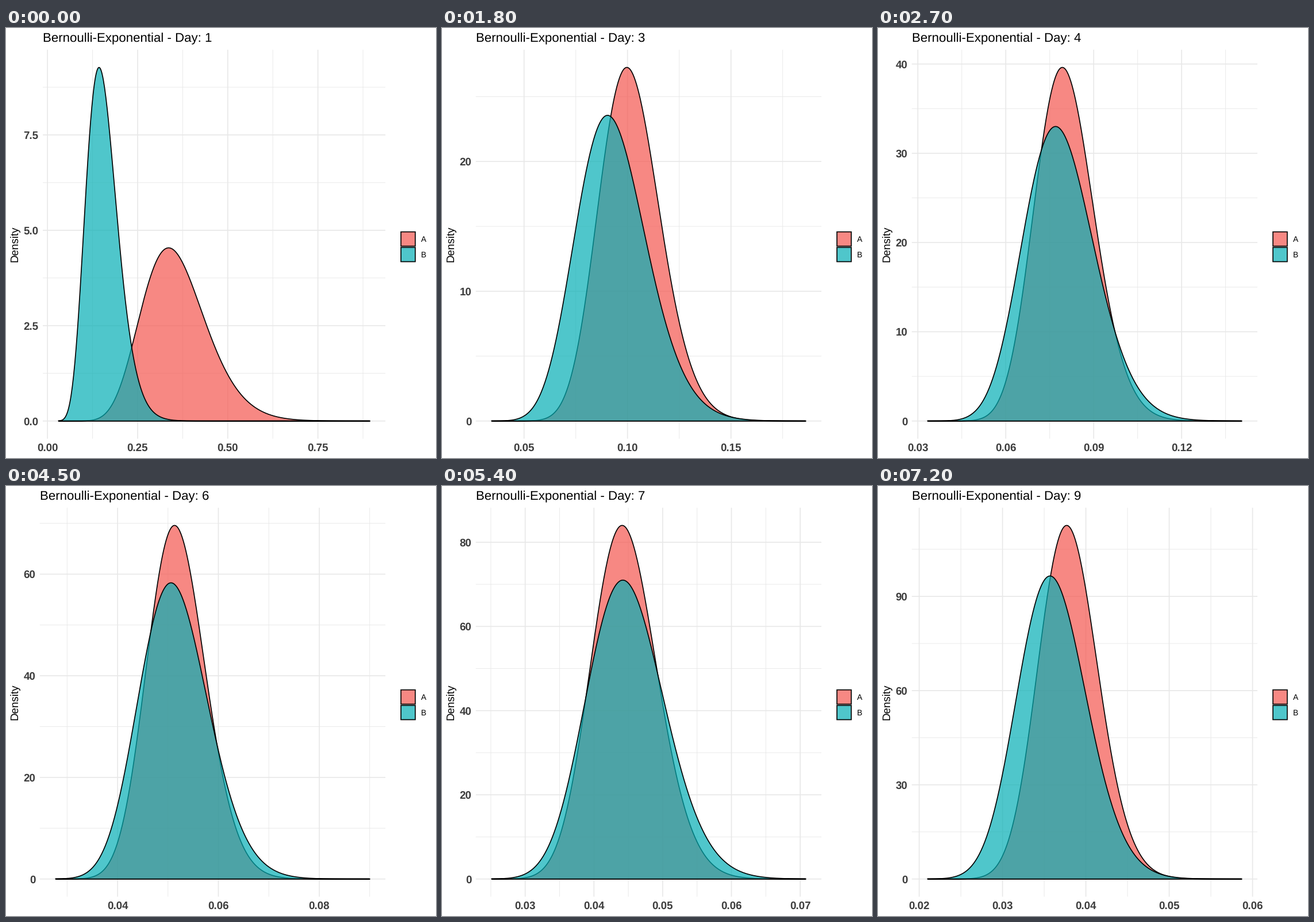
Write a matplotlib script that moves like this. It is 748 px wide and 748 px high and loops after 8 s.

```python
import math

import matplotlib.pyplot as plt
import numpy as np
from matplotlib.animation import ArtistAnimation
from matplotlib.patches import Polygon, Rectangle

SIZE, DPI = 748, 100
PX = 72 / DPI                      # points per pixel
TOP, BOTTOM, RIGHT = 37.8, 714.4, 660
GRID, TICK = "#E8E8E8", "#3D3D3D"
ALPHA = 0.7
STEP_MS, LOOP_MS, DAY_MS = 100, 8000, 900

# Key points of each curve; days between them follow a power law.
KEY_DAYS = [1, 2, 4, 6, 7, 9]
X_MIN = [0.0302, 0.0357, 0.0333, 0.0277, 0.0251, 0.021]
X_MAX = [0.894, 0.2766, 0.1405, 0.09, 0.0708, 0.0587]
CURVES = {
    "A": ("#F5564F", [0.336, 0.1376, 0.0793, 0.0513, 0.0441, 0.0377],
          [4.54, 16.08, 39.62, 69.6, 84.0, 112.6]),
    "B": ("#05AFB5", [0.143, 0.1132, 0.077, 0.0506, 0.0442, 0.0357],
          [9.27, 14.65, 33.0, 58.3, 71.0, 96.5]),
}

plt.rcParams["text.hinting"] = "none"
fig = plt.figure(figsize=(SIZE / DPI, SIZE / DPI), dpi=DPI, facecolor="white")
ax = fig.add_axes([0, 0, 1, 1])
ax.set_xlim(0, SIZE)
ax.set_ylim(SIZE, 0)
ax.axis("off")


def text(x, y, s, size, color="black", **kw):
    return ax.text(x, y, s, fontsize=size * PX, color=color, va="baseline",
                   family="Liberation Sans", **kw)


def line(xs, ys, color, width, z):
    return ax.plot(xs, ys, color=color, lw=width * PX, zorder=z, snap=False,
                   solid_capstyle="butt", solid_joinstyle="round")[0]


def on_day(day, values):
    return math.exp(np.interp(math.log(day), np.log(KEY_DAYS), np.log(values)))


def density(x, mode, peak):
    """Gamma density; unit area ties its shape to mode and peak height."""
    shape = (mode * peak / 0.4) ** 2
    r = x / mode
    return peak * np.exp(shape * (np.log(r) - r + 1))


def nice_step(span):
    """Round step near span / 3.6, preferring the simpler multiples."""
    best = None
    for rank, base in enumerate((2, 1, 2.5, 3, 5)):
        for power in range(-3, 3):
            step = round(base * 10.0 ** power, 6)
            cost = abs(math.log(span / step / 3.6)) + 0.055 * rank
            if best is None or cost < best[0]:
                best = cost, step
    return best[1]


def decimals(step):
    return next(d for d in range(6) if abs(round(step, d) - step) < 1e-9)


def ticks(lo, hi, step):
    """Multiples of half a step within lo..hi, labelled when major."""
    half = step / 2
    for k in range(math.ceil(lo / half), math.floor(hi / half) + 1):
        yield k * half, "" if k % 2 else f"{k * half:.{decimals(step)}f}"


def scene(day):
    lo, hi = on_day(day, X_MIN), on_day(day, X_MAX)
    x = np.linspace(lo, hi, 512)
    shapes = [(color, density(x, on_day(day, modes), on_day(day, peaks)))
              for color, modes, peaks in CURVES.values()]
    top = max(h.max() for _, h in shapes)
    xstep, ystep = nice_step(hi - lo), nice_step(top)
    left = 64 if decimals(ystep) else 58.8
    xpad, ypad = (RIGHT - left) / 22, (BOTTOM - TOP) / 22

    def to_x(v):
        return left + xpad + (v - lo) / (hi - lo) * (RIGHT - left - 2 * xpad)

    def to_y(v):
        return BOTTOM - ypad - v / top * (BOTTOM - TOP - 2 * ypad)

    parts = [text(left, 24.4, f"Bernoulli-Exponential - Day: {day}", 22.25)]
    margin = (hi - lo) * 0.05
    for v, label in ticks(lo - margin, hi + margin, xstep):
        px = to_x(v)
        parts += [line([px, px], [TOP, BOTTOM], GRID, 1.67 if label else 0.9, 1),
                  text(px, 735.7, label, 18.75, TICK, ha="center", weight="bold")]
    for v, label in ticks(0, top * 1.05, ystep):
        py = to_y(v)
        parts += [line([left, RIGHT], [py, py], GRID, 1.67 if label else 0.9, 1),
                  text(left - 7.6, py + 6.7, label, 18.75, TICK, ha="right",
                       weight="bold")]

    for i, (color, h) in enumerate(shapes):
        xs = to_x(np.r_[lo, x, hi, lo])
        ys = to_y(np.r_[0, h, 0, 0])
        area = Polygon(np.c_[xs, ys], facecolor=color, edgecolor="none",
                       alpha=ALPHA, zorder=2 + 2 * i)
        parts += [ax.add_patch(area), line(xs, ys, "black", 1.67, 3 + 2 * i)]
    return parts


text(20.9, 376.2, "Density", 18.75, rotation=90, ha="center",
     rotation_mode="anchor")
for i, (name, (color, *_)) in enumerate(CURVES.items()):
    cy = 367.1 + 27 * i
    box = dict(xy=(687, cy - 12.5), width=24.9, height=24.9, snap=False)
    ax.add_patch(Rectangle(**box, facecolor=color, alpha=ALPHA, edgecolor="none"))
    ax.add_patch(Rectangle(**box, fill=False, edgecolor="black", lw=1.67 * PX))
    text(721.5, cy + 5, name, 13.75)

scenes = [scene(d) for d in range(1, 10)]
frames = [scenes[t // DAY_MS] for t in range(0, LOOP_MS, STEP_MS)]
anim = ArtistAnimation(fig, frames, interval=STEP_MS, repeat=True,
                       repeat_delay=0, blit=False)
plt.show()
```
